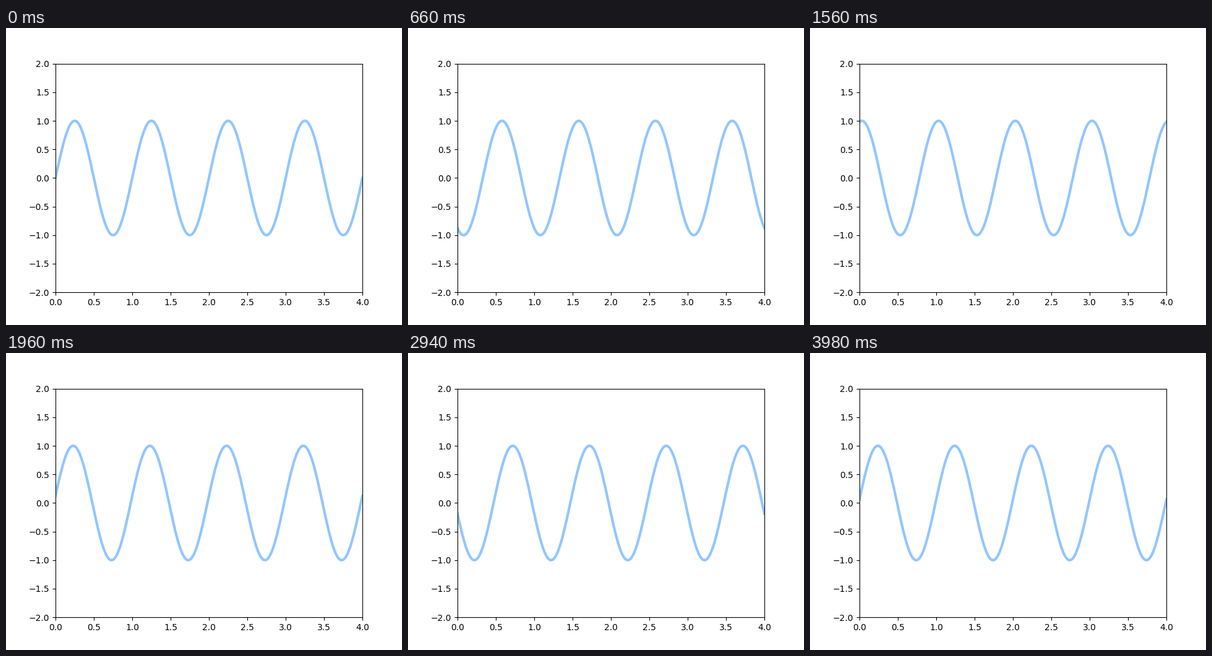
These frames come from a looping animation (640 px wide and 480 px high, 4000 ms). A matplotlib script:

```python
import numpy as np
import matplotlib.pyplot as plt
from matplotlib.animation import FuncAnimation

FRAMES = 200
INTERVAL = 20   # ms
STEP = 0.01     # shift to the right per frame, in x units

fig = plt.figure(figsize=(6.4, 4.8), dpi=100)
ax = plt.axes(xlim=(0, 4), ylim=(-2, 2))
x = np.linspace(0, 4, 1000)
line, = ax.plot([], [], lw=3, color="#92C6FF")


def update(i):
    line.set_data(x, np.sin(2 * np.pi * (x - STEP * i)))
    return line,


anim = FuncAnimation(fig, update, frames=FRAMES, interval=INTERVAL,
                     repeat=True, repeat_delay=0, blit=True)
plt.show()
```
